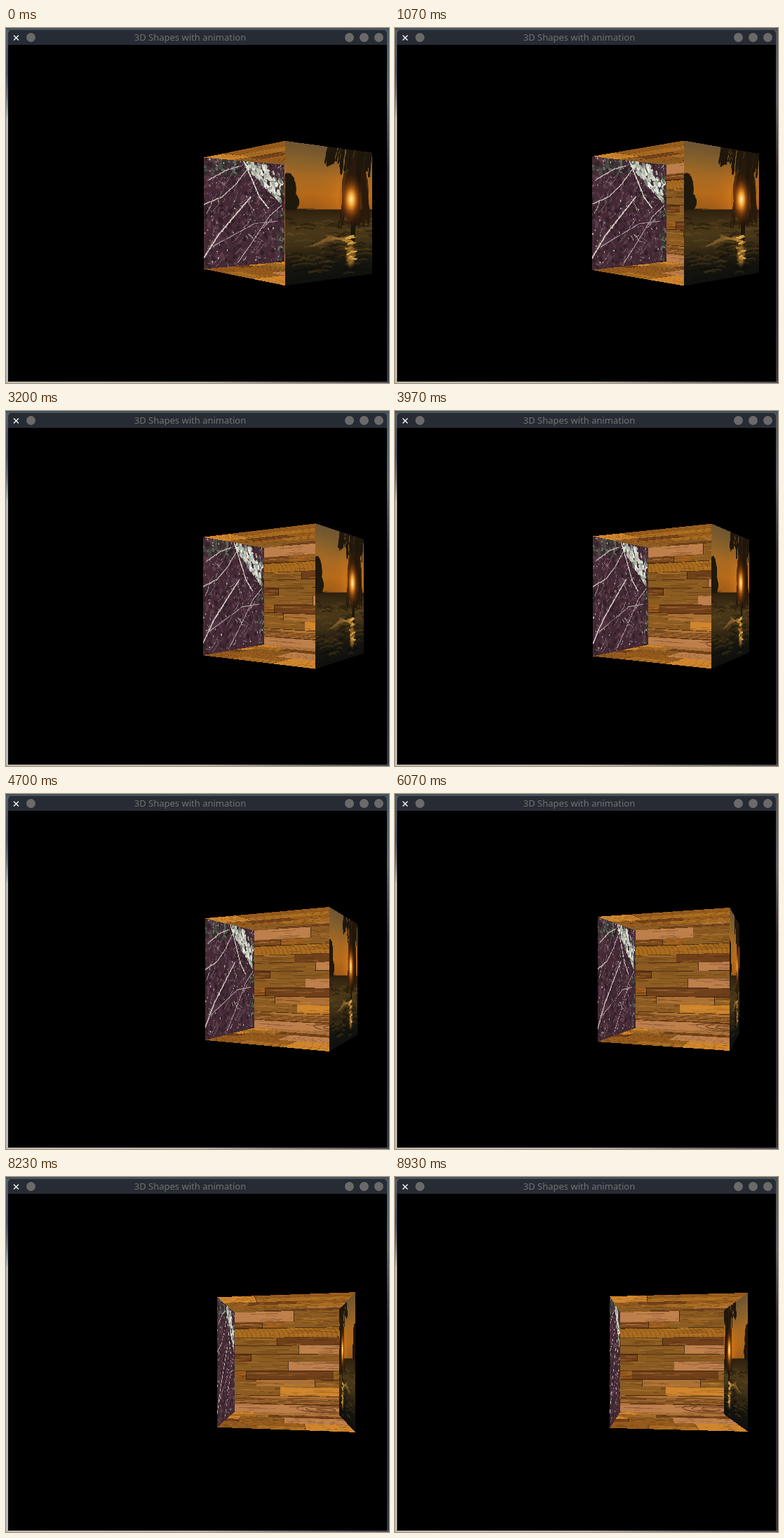
An HTML page with a canvas that plays this animation: 546 by 506 pixels, repeating every 8960 ms.

```html
<!DOCTYPE html>
<html lang="en">
<head>
<meta charset="utf-8">
<title>3D Shapes with animation</title>
<style>
html, body { margin: 0; width: 546px; height: 506px; overflow: hidden; background: #000; }
canvas { position: absolute; left: 0; top: 0; display: block; }
#title {
  position: absolute; left: 0; top: 3px; width: 525px; text-align: center;
  font: 13px/20px "Noto Sans", "Open Sans", sans-serif; color: #73736f; white-space: nowrap;
}
</style>
</head>
<body>
<canvas id="stage" width="546" height="506"></canvas>
<div id="title">3D Shapes with animation</div>
<script>
const LOOP = 8960, STEP = 100 / 3, LAST = 268;
const FOCAL = 240 / Math.tan(Math.PI / 8);   // 45 degree view, 480 px high
const CX = 273, CY = 264;                    // middle of the viewport
const OFF_X = 1.5, OFF_Z = 7;                // cube centre
const BOX = { x: 274, y: 154, w: 256, h: 220 };
const S = 180;                               // texture size

const ctx = document.getElementById('stage').getContext('2d');

let seed = 7;
function rnd(a = 0, b = 1) {
  seed = (seed * 1664525 + 1013904223) >>> 0;
  return a + (b - a) * seed / 4294967296;
}

function texture(paint) {
  const c = document.createElement('canvas');
  c.width = c.height = S;
  const g = c.getContext('2d');
  g.scale(S, S);
  paint(g);
  return new Uint32Array(g.getImageData(0, 0, S, S).data.buffer);
}

function stops(grad, colors) {
  colors.forEach((c, i) => grad.addColorStop(i / (colors.length - 1), c));
  return grad;
}
const gradient = (g, y0, y1, ...colors) => stops(g.createLinearGradient(0, y0, 0, y1), colors);

function line(g, color, width, ...pts) {
  g.strokeStyle = color;
  g.lineWidth = width;
  g.beginPath();
  for (let i = 0; i < pts.length; i += 2) g.lineTo(pts[i], pts[i + 1]);
  g.stroke();
}

function blob(g, color, x, y, rx, ry, turn = 0) {
  g.fillStyle = color;
  g.beginPath();
  g.ellipse(x, y, rx, ry, turn, 0, 7);
  g.fill();
}

// Soft round light, stretched vertically
function glow(g, x, y, r, stretch, ...colors) {
  g.save();
  g.translate(x, y);
  g.scale(1, stretch);
  blob(g, stops(g.createRadialGradient(0, 0, 0, 0, 0, r), colors), 0, 0, r, r);
  g.restore();
}

const WOOD = {
  o: '#8c5c22', g: '#a96c20', d: '#70401a', p: '#bd7f4c', l: '#ab7034', b: '#cf852c', m: '#955a1c'
};

function plank(g, x, y, w, h, kind) {
  g.save();
  g.beginPath();
  g.rect(x, y, w, h);
  g.clip();
  g.fillStyle = WOOD[kind];
  g.fillRect(x, y, w, h);
  for (let i = 0; i < h * 160; i++) {
    const gx = x + rnd(-.1, 1) * w, gy = y + rnd() * h, len = rnd(.05, .3);
    const color = rnd() < .6 ? 'rgba(60,25,5,.28)' : 'rgba(225,150,70,.25)';
    line(g, color, rnd(.004, .008), gx, gy, gx + len / 2, gy + rnd(-.006, .006), gx + len, gy);
  }
  g.restore();
  line(g, 'rgba(45,22,0,.25)', .005, x, y + h, x + w, y + h);
}

// Each row: kind, end, kind, end ... from left to right
function planks(g, rows, edges) {
  rows.forEach((row, i) => {
    const y = edges ? edges[i] : i / rows.length;
    const end = edges ? edges[i + 1] : (i + 1) / rows.length;
    let x = 0;
    for (let k = 0; k < row.length; k += 2) {
      plank(g, x, y, row[k + 1] - x, end - y, row[k]);
      x = row[k + 1];
    }
  });
}

const backWood = texture(g => {
  planks(g, [
    ['p', .58, 'o', 1],
    ['d', .28, 'm', .5, 'o', 1],
    ['g', 1],
    ['o', .42, 'd', 1],
    ['o', .63, 'p', 1],
    ['d', .17, 'o', 1],
    ['o', .53, 'p', 1],
    ['m', .12, 'd', .95, 'o', 1],
    ['o', .22, 'l', .78, 'o', 1],
    ['o', .45, 'b', 1],
    ['l', 1],
    ['p', 1]
  ], [0, .1, .165, .26, .335, .42, .495, .585, .67, .745, .83, .915, 1]);
  for (let x = -.1; x < 1; x += .045)
    line(g, 'rgba(85,45,0,.35)', .007, x, .165, x + .04, .2, x + .055, .26);
  for (let i = 0; i < 4; i++)
    line(g, 'rgba(65,28,0,.55)', .008, 0, .85 + i * .017, .4, .865 + i * .016, .7, .85 + i * .018, 1, .87 + i * .015);
  g.strokeStyle = 'rgba(70,30,0,.6)';
  for (let i = 1; i < 4; i++) {
    g.beginPath();
    g.ellipse(.88, .955, .09 * i, .012 * i, .03, 0, 7);
    g.stroke();
  }
});

const topWood = texture(g => planks(g, [
  ['b', .28, 'm', 1],
  ['b', .28, 'g', 1],
  ['o', .2, 'd', .6, 'm', 1],
  ['m', .45, 'g', 1],
  ['o', .7, 'l', 1],
  ['o', .3, 'd', 1]
]));

const floorWood = texture(g => planks(g, [
  ['m', .3, 'g', .66, 'b', 1],
  ['m', .66, 'b', 1],
  ['d', .12, 'm', .5, 'p', 1],
  ['b', .1, 'o', .5, 'p', 1],
  ['g', .35, 'd', 1],
  ['b', .2, 'l', 1]
]));

const marble = texture(g => {
  g.fillStyle = '#452a36';
  g.fillRect(0, 0, 1, 1);
  const tones = ['#35202a', '#523442', '#3d2630', '#5b3c49', '#2e2024'];
  for (let i = 0; i < 420; i++)
    blob(g, tones[i % 5], rnd(), rnd(), rnd(.006, .035), rnd(.006, .025), rnd(0, 3));
  // grey-green rims
  for (let i = 0; i < 110; i++) {
    const right = i % 2;
    blob(g, ['#2a2e28', '#5f675c', '#3a3c34', '#474c44'][i >> 1 & 3], right ? rnd(.9, 1) : rnd(0, .5), right ? rnd() : rnd(0, .15),
      rnd(.01, .03), rnd(.008, .018), rnd(0, 3));
  }
  for (let i = 0; i < 80; i++) {
    const x = rnd(), y = rnd(), len = rnd(.03, .16), a = rnd() < .7 ? rnd(-1.2, -.5) : rnd(.2, 1.3);
    line(g, i % 3 ? 'rgba(185,165,165,.45)' : 'rgba(215,208,200,.75)', rnd(.003, .008),
      x, y, x + Math.cos(a) * len * .5 + .01, y + Math.sin(a) * len * .5, x + Math.cos(a) * len, y + Math.sin(a) * len);
  }
  // pale wedge widening towards the right edge
  for (let i = 0; i < 110; i++) {
    const k = rnd();
    blob(g, ['#d3d6ca', '#a9b0a2', '#e8e9e0', '#737b70', '#c2c6b8'][i % 5], .5 + k * .46, rnd(k * k * .12, .06 + k * .34),
      rnd(.012, .045), rnd(.01, .025), rnd(.4, 1.2));
  }
  line(g, '#cdc2bc', .015, 0, .9, .16, .7, .386, .49, .55, .34);
  line(g, '#b9a5a6', .01, .386, .97, .55, .8, .79, .53, .96, .42);
  line(g, '#d6d2c8', .014, .46, 0, .58, .2, .66, .34, .78, .45);
  line(g, '#c3b8b2', .01, 0, .42, .2, .35, .36, .23, .5, .08);
  line(g, '#a8949a', .008, .1, .8, .3, .72, .6, .6, .9, .58);
  line(g, '#c2bab2', .01, .05, .2, .25, .1, .42, .05);
  for (let i = 0; i < 150; i++)
    blob(g, i % 2 ? '#bfb8b0' : '#8d7f80', rnd(), Math.pow(rnd(), 1.3), rnd(.003, .011), rnd(.003, .008), rnd(0, 3));
});

const sunset = texture(g => {
  g.fillStyle = gradient(g, 0, .48, '#6d5432', '#87602a', '#a86a22', '#b56a1a', '#9c5916');
  g.fillRect(0, 0, 1, .48);
  glow(g, .68, .38, .4, .8, 'rgba(235,140,30,.8)', 'rgba(205,115,25,.4)', 'rgba(190,100,20,0)');
  g.fillStyle = gradient(g, .46, 1, '#2a1e0e', '#3d2d14', '#4a3818', '#3f3016', '#241d10', '#14140f', '#0f100e');
  g.fillRect(0, .47, 1, .53);
  for (let i = 0; i < 110; i++) {
    const x = rnd(-.1, 1), y = rnd(.54, .98), w = rnd(.06, .25);
    line(g, i % 2 ? 'rgba(125,90,40,.22)' : 'rgba(12,12,8,.35)', .014, x, y, x + w / 2, y - .008, x + w, y + .006);
  }
  for (let i = 0; i < 8; i++)
    line(g, 'rgba(160,115,55,.3)', .014, .25 + i * .03, .74 - i * .008, .45, .71 - i * .006, .68, .68 + i * .006);
  // tree at the left
  g.fillStyle = '#1f180c';
  g.fillRect(0, .3, .05, .18);
  blob(g, '#1f180c', .03, .33, .08, .11);
  blob(g, '#1f180c', .08, .42, .06, .06);
  // palm
  g.lineCap = 'round';
  blob(g, 'rgba(34,22,10,.75)', .78, .33, .17, .27);
  blob(g, 'rgba(34,22,10,.8)', .8, .08, .14, .14);
  for (let i = 0; i < 36; i++) {
    const x = rnd(.45, 1), len = (x < .62 ? .06 : .1) + rnd(0, .1);
    line(g, '#20170c', rnd(.015, .03), x, 0, x - .02, len * .5, x - .035, len);
  }
  for (let i = 0; i < 60; i++) {
    const x = rnd(-1, 1);
    line(g, '#2a1a0b', rnd(.01, .022), .8, .06, .79 + x * .12, .2, .77 + x * .2, rnd(.36, .62));
  }
  line(g, '#1e160b', .06, .83, .05, .8, .4, .75, .6, .74, .8);
  glow(g, .725, .39, .16, 1.3, '#fff0b4', '#f0a030', 'rgba(200,100,20,.6)', 'rgba(140,60,10,.3)', 'rgba(120,50,10,0)');
  // light on the water
  glow(g, .72, .83, .07, 1.6, '#f2c468', 'rgba(205,140,50,.75)', 'rgba(120,80,25,0)');
  for (let i = 0; i < 24; i++)
    blob(g, ['#b07c2c', '#7c5822', '#dca848'][i % 3], .71 + rnd(-.06, .06), rnd(.68, .92), rnd(.015, .05), .007, rnd(-.3, .3));
});

function paintWindow() {
  ctx.fillStyle = '#44535c';
  ctx.fillRect(0, 0, 546, 506);
  ctx.fillStyle = gradient(ctx, 0, 128, '#56646c', '#4c5868', '#465268', '#6c7480', '#b4b6b4');
  ctx.fillRect(0, 3, 4, 125);
  ctx.fillStyle = '#babbb4';
  ctx.fillRect(0, 127, 4, 379);
  ctx.fillStyle = gradient(ctx, 0, 506, '#4c5a64', '#5c6470', '#2a2e3a', '#2a2e3c', '#2c303e', '#343844');
  ctx.fillRect(542, 3, 4, 503);
  ctx.fillStyle = stops(ctx.createLinearGradient(0, 0, 546, 0), ['#bcbcb6', '#bababa', '#b2b2b0', '#74767a', '#484c58']);
  ctx.fillRect(0, 503, 546, 3);
  ctx.fillStyle = '#262b34';
  ctx.beginPath();
  ctx.roundRect(3, 3, 540, 24, [5, 5, 0, 0]);
  ctx.fill();
  ctx.fillStyle = '#000';
  ctx.fillRect(3, 24, 540, 480);
  for (const x of [35.5, 489.5, 510.5, 531.5]) blob(ctx, '#6a6a68', x, 13.5, 6.5, 6.5);
  line(ctx, '#f2f2ee', 1.5, 11, 10.5, 18, 17.5);
  line(ctx, '#f2f2ee', 1.5, 18, 10.5, 11, 17.5);
}

const image = ctx.createImageData(BOX.w, BOX.h);
const pixels = new Uint32Array(image.data.buffer);
const cell = v => Math.max(0, Math.min(S - 1, (v + 1) / 2 * S | 0));
const sample = (tex, u, v) => tex[cell(v) * S + cell(u)];

// Cast one ray per pixel into an open box turned about the vertical axis
function paintCube(angle) {
  const c = Math.cos(angle), s = Math.sin(angle);
  const oa = OFF_Z * s - OFF_X * c, ob = -OFF_X * s - OFF_Z * c;
  pixels.fill(0xff000000);
  for (let j = 0; j < BOX.h; j++) {
    const dy = (BOX.y + j + .5 - CY) / FOCAL, ty = 1 / Math.abs(dy);
    for (let i = 0; i < BOX.w; i++) {
      const dx = (BOX.x + i + .5 - CX) / FOCAL;
      const da = dx * c - s, db = dx * s + c;
      const a1 = (-Math.sign(da) - oa) / da, a2 = (Math.sign(da) - oa) / da;
      const b1 = (-1 - ob) / db, b2 = (1 - ob) / db;
      const near = Math.max(a1, b1), far = Math.min(a2, b2, ty);
      if (!(near < far)) continue;
      const t = a1 > b1 ? a1 : far;
      const a = oa + t * da, b = ob + t * db, y = t * dy;
      let color;
      if (t === a1) color = sample(da < 0 ? sunset : marble, b, y);
      else if (t === a2) color = sample(da < 0 ? marble : sunset, b, y);
      else if (t === b2) color = sample(backWood, a, y);
      else color = sample(dy < 0 ? topWood : floorWood, a, b);
      pixels[j * BOX.w + i] = color;
    }
  }
  ctx.putImageData(image, BOX.x, BOX.y);
}

// Steady turn with a slight drift in speed, in degrees
const turn = k => 56.9 - 47.7 * k + .3 * Math.sin(2 * Math.PI * k);

const start = performance.now();
function tick() {
  const t = (performance.now() - start) % LOOP;
  // steps begin at multiples of 33.3 ms rounded to 10 ms
  const step = Math.min(LAST, Math.floor((t + 5) / STEP));
  paintCube(turn(step / LAST) * Math.PI / 180);
  requestAnimationFrame(tick);
}
paintWindow();
tick();
</script>
</body>
</html>
```
